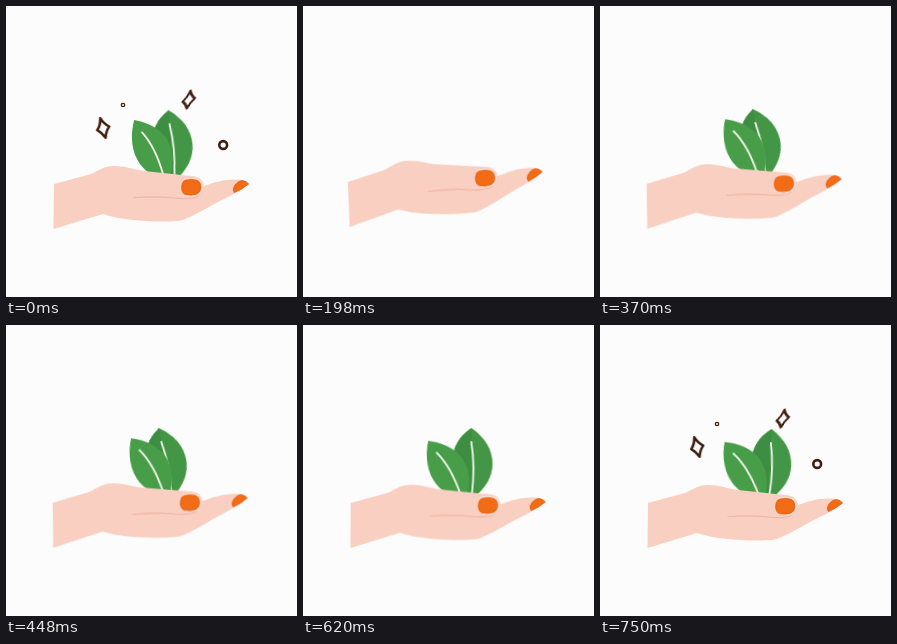
Animation of 291x291 px, one loop 0.87 s. Source, as an HTML page without scripts:

```html
<!DOCTYPE html>
<html lang="en">
<head>
<meta charset="utf-8">
<title>Hand with leaves</title>
<style>
  html, body { margin: 0; width: 100%; height: 100%; overflow: hidden; background: #fcfcfc; }
  svg { display: block; width: 100%; height: 100%; }

  /* Every part holds its pose, then jumps to the next one. */
  .hand, .leaf, .star, .dots { animation: .87s step-end infinite; }
  .hand { animation-name: hand; transform-origin: 48px 200px; }
  .left.leaf { animation-name: left-leaf; transform-origin: 160px 168px; }
  .right.leaf { animation-name: right-leaf; transform-origin: 168px 170px; }
  .left.star { animation-name: left-star; }
  .right.star { animation-name: right-star; }
  .dots { animation-name: dots; }

  .left.leaf { fill: #489d48; }
  .right.leaf { fill: #439645; }
  .shade { fill: #3d8d42; }
  .vein { fill: none; stroke: #f4faee; stroke-width: 1.8; stroke-linecap: round; }
  .star, .dots { fill: #fcfcfc; stroke: #3f1e0f; stroke-linejoin: round; }
  .star { stroke-width: 2.5; }
  .skin { fill: #f8cfc0; }
  .nail { fill: #f26b15; stroke: #e55d0d; stroke-width: .8; }
  .crease { fill: none; stroke: #efb5a6; stroke-width: 1.1; stroke-linecap: round; }
  .rim { fill: none; stroke: #fbdfd4; stroke-width: 1.2; }

  @keyframes hand {
    0%, 86.207% { transform: none; }
    13.793% { transform: translate(-2px, -2px) rotate(-3deg); }
    28.736% { transform: translate(-1.4px, -1px) rotate(-2.35deg); }
    42.529% { transform: translate(-.8px, -.2px) rotate(-1.4deg); }
    57.471% { transform: translate(-.4px, 0) rotate(-.85deg); }
    71.264% { transform: translate(-.2px, 0) rotate(-.3deg); }
  }
  @keyframes left-leaf {
    0% { transform: none; visibility: visible; }
    13.793% { visibility: hidden; }
    28.736% { transform: translate(-3px, -4px) rotate(-6deg); visibility: visible; }
    42.529% { transform: translate(-.3px, -2.5px) rotate(-3deg); visibility: visible; }
    57.471% { transform: translate(-.2px, -1.5px) rotate(-1.2deg); visibility: visible; }
    71.264% { transform: rotate(-3.2deg); visibility: visible; }
    86.207% { transform: translate(1px, 0) rotate(-5deg); visibility: visible; }
  }
  @keyframes right-leaf {
    0% { transform: rotate(-4.7deg); visibility: visible; }
    13.793%, 28.736% { visibility: hidden; }
    42.529% { transform: translate(-3px, -2px) rotate(-10.5deg); visibility: visible; }
    57.471% { transform: translate(-1px, -2px) rotate(-5.2deg); visibility: visible; }
    71.264% { transform: translate(.5px, -1px); visibility: visible; }
    86.207% { transform: translate(1px, 0) rotate(2.3deg); visibility: visible; }
  }
  @keyframes left-star {
    0%, 86.207% { transform: translate(97.2px, 122px); visibility: visible; }
    13.793%, 42.529%, 71.264% { visibility: hidden; }
    28.736% { transform: translate(102.4px, 113.6px) scale(.87); visibility: visible; }
    57.471% { transform: translate(95.8px, 121.5px); visibility: visible; }
  }
  @keyframes right-star {
    0%, 86.207% { transform: translate(183px, 93.5px) skewX(-25deg) scale(.9); visibility: visible; }
    13.793%, 42.529%, 71.264% { visibility: hidden; }
    28.736% { transform: translate(181px, 105px) skewX(-25deg) scale(.8); visibility: visible; }
    57.471% { transform: translate(181.2px, 91.8px) skewX(-25deg) scale(.9); visibility: visible; }
  }
  @keyframes dots {
    0%, 86.207% { visibility: visible; }
    13.793%, 28.736%, 42.529%, 57.471%, 71.264% { visibility: hidden; }
  }
</style>
</head>
<body>
<svg viewBox="0 0 291 291">
  <defs>
    <path id="sparkle" d="M-3-9.8Q.6-4 6-1.400Q2.600 3.400 2.400 9.800Q-1.400 4.600-6 2.200Q-2.600-2.800-3-9.800Z"/>
  </defs>

  <g class="right leaf">
    <path d="M168 104C182 114 189 126 189 140C189 153 182 164 170 174C157 164 149 152 149 138C149 123 156 112 168 104Z"/>
    <path class="shade" d="M168 104C156 112 149 123 149 138C149 152 157 164 170 174Q171.500 145 168 118Z"/>
    <path class="vein" d="M167.800 118Q171.800 143 168.300 171"/>
  </g>
  <g class="left leaf">
    <path d="M128.200 114C143 117 155 123 161.500 134C168 145 168 157 164 173C150 173 138 166 131.500 154C125 142 124.500 128 128.200 114Z"/>
    <path class="vein" d="M136 126.300Q149.500 141 157.300 169"/>
  </g>

  <g class="hand">
    <path class="skin" d="M48 178L85 168C94 164 98 160 108 160C119 160 125 163 138 165L185 170C193 170 197 174 198 180C209 176 219 173 231 173.500C237 173.500 241 175 243 178C237 183 229 188 220 192C205 199 192 208 177 214C166 217 119 216 97 208L47.500 223Z"/>
    <path class="crease" d="M128 191.500Q150 190 168 192Q184 194 192 190"/>
    <path class="rim" d="M178 172.600H188Q196.500 173 196.700 181Q196 190 186 190.700"/>
    <path class="nail" d="M179 174.300Q186 172.500 191 174.300Q194.800 176 194.800 181Q194.800 186 191 188Q185 190 179 188.300Q175.800 187 175.600 181.500Q175.800 176 179 174.300Z"/>
    <path class="nail" d="M228.300 186.500Q226 183 229 179Q232.500 174.500 236.500 174.500Q240.500 175 242.500 178Q236 183.500 228.300 186.500Z"/>
  </g>

  <use class="left star" href="#sparkle"/>
  <use class="right star" href="#sparkle"/>
  <g class="dots">
    <circle cx="117" cy="99" r="1.700" stroke-width="1.300"/>
    <circle cx="217.200" cy="139" r="3.900" stroke-width="2.600"/>
  </g>
</svg>
</body>
</html>
```
